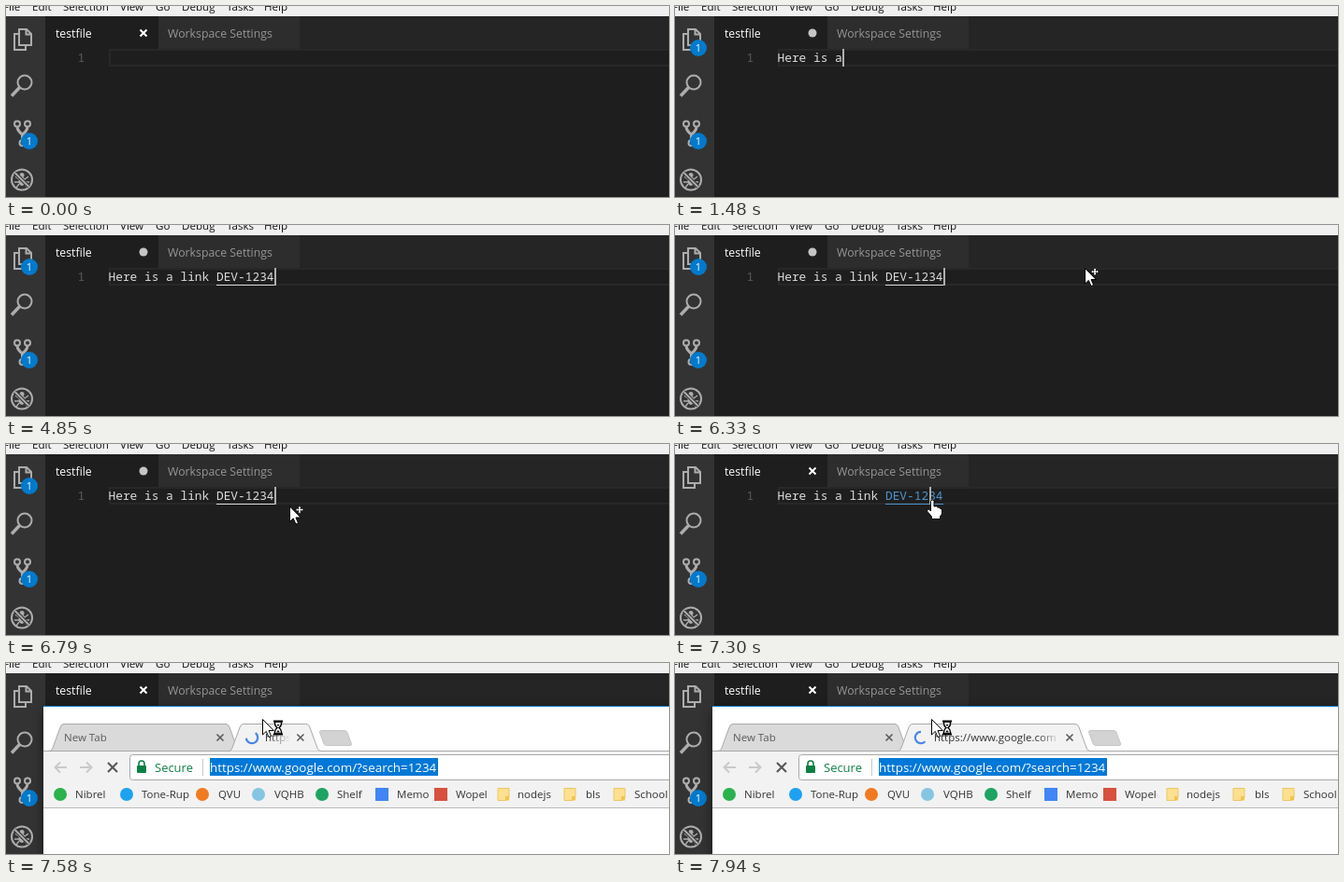
These frames come from a looping animation (709x205 px, 7990 ms). An HTML page:

```html
<!DOCTYPE html>
<html lang="en">
<head>
<meta charset="utf-8">
<title>Editor link</title>
<style>
  html, body { margin: 0; width: 709px; height: 205px; overflow: hidden; background: #1e1e1e; }
  svg { display: block; }
  text { font-family: "Open Sans", "Noto Sans", sans-serif; white-space: pre; }
  .menu { font-size: 11.6px; fill: #111; }
  .tab { font-size: 12.3px; }
  .code { font-family: "Noto Sans Mono", "DejaVu Sans Mono", monospace; font-size: 12.83px; fill: #dcdcdc; }
  .chrome { font-size: 11.5px; fill: #333; }
  .omni { font-size: 13.4px; }
  .badge { font-size: 11px; fill: #fff; text-anchor: middle; }
  .icon { fill: none; stroke: #adadad; stroke-width: 2; }
  .close { fill: none; stroke: #5a5a5a; stroke-width: 1.6; }
  .nav { fill: none; stroke: #c9c9c9; stroke-width: 2; }
  .dark { stroke: #555; }
  .pointer { fill: #fff; stroke: #000; stroke-linejoin: round; }
</style>
</head>
<body>
<svg id="stage" width="709" height="205" viewBox="0 0 709 205">
  <defs>
    <linearGradient id="fadeOut">
      <stop offset="0" stop-color="#f2f2f2" stop-opacity="0"/>
      <stop offset="1" stop-color="#f2f2f2"/>
    </linearGradient>
    <filter id="shadow" x="-10%" y="-20%" width="120%" height="140%">
      <feGaussianBlur stdDeviation="6"/>
    </filter>
    <path id="arrow" d="M.5 .5V17L4.3 13.4 7 19.6 9.6 18.4 7 12.5H12.3z"/>
  </defs>

  <rect width="709" height="205" fill="#1e1e1e"/>
  <rect width="709" height="11" fill="#f0f0f0"/>
  <g id="menu" class="menu"></g>

  <!-- editor tabs -->
  <rect x="42" y="11" width="667" height="35" fill="#252526"/>
  <rect x="42" y="11" width="121" height="35" fill="#1e1e1e"/>
  <rect x="163" y="11" width="151" height="35" fill="#2d2d2d"/>
  <text class="tab" x="53" y="34" fill="#fff">testfile</text>
  <text class="tab" x="173" y="34" fill="#969696">Workspace Settings</text>
  <path id="saved" d="M143.5 25.5l7 7m0-7l-7 7" stroke="#fff" stroke-width="2"/>
  <circle id="dirty" cx="147" cy="29" r="4.5" fill="#c5c5c5"/>

  <!-- activity bar -->
  <rect y="11" width="42" height="194" fill="#333"/>
  <g class="icon">
    <path d="M14 25H22L27 30V42H14zM21.500 25V30.500H27M13 30H9V47H21V43"/>
    <circle cx="20" cy="82" r="7.500"/>
    <path d="M14.500 87.500L6 96.500" stroke-width="3.500"/>
    <circle cx="12" cy="126.500" r="3"/>
    <circle cx="23" cy="126.500" r="3"/>
    <circle cx="17.500" cy="147" r="3"/>
    <path d="M12 130Q12.500 134 17.500 138Q22.500 134 23 130M17.500 137V144" stroke-width="3"/>
    <circle cx="17" cy="186.500" r="11"/>
    <ellipse cx="17" cy="188" rx="3.500" ry="5" fill="#adadad" stroke="none"/>
    <circle cx="17" cy="181.500" r="2.500" fill="#adadad" stroke="none"/>
    <path d="M10 183L14 186M24 183L20 186M9 189H14M25 189H20M11 195L14 191M23 195L20 191" stroke-width="1.400"/>
    <path d="M9.500 179L24.500 194" stroke="#333" stroke-width="4"/>
    <path d="M9.500 179L24.500 194"/>
  </g>
  <g id="filesBadge">
    <circle cx="25" cy="45" r="9" fill="#007acc"/>
    <text class="badge" x="25" y="49">1</text>
  </g>
  <circle cx="25" cy="145" r="9" fill="#007acc"/>
  <text class="badge" x="25" y="149">1</text>

  <!-- code line -->
  <rect x="111" y="47" width="620" height="17" fill="none" stroke="#282828" stroke-width="2"/>
  <text class="code" x="76.500" y="60" style="fill:#5a5a5a">1</text>
  <text class="code" x="109.500" y="60"><tspan id="plain"></tspan><tspan id="link"></tspan></text>
  <rect id="underline" x="225" y="64" width="62" height="1"/>
  <rect id="caret" y="46" width="2" height="19" fill="#aeafad"/>

  <!-- browser window -->
  <g id="browser">
    <rect x="40" y="50" width="720" height="200" opacity=".5" filter="url(#shadow)"/>
    <rect x="40" y="46" width="669" height="159" fill="#fff"/>
    <rect x="40" y="46" width="669" height="1" fill="#1883d7"/>
    <g stroke="#a9a9a9">
      <path id="plus" d="M249.500 74q0-1.500 2-1.500H276q2 0 3 2l4.500 12q.5 2-1.500 2H257q-2 0-3-2z" fill="#d3d3d3" stroke="#c4c4c4"/>
      <path id="backTab"/>
      <path d="M40 94.500H709"/>
    </g>
    <text id="firstTitle" class="chrome" x="62" y="84">New Tab</text>
    <path class="close" d="M225.500 76.500l7 7m0-7l-7 7"/>
    <rect x="40" y="95" width="669" height="60" fill="#f2f2f2"/>
    <path id="frontTab" fill="#f2f2f2" stroke="#a9a9a9"/>
    <g id="frontFirst">
      <text class="chrome" x="62" y="84">New Tab</text>
      <path class="close" d="M225.500 76.500l7 7m0-7l-7 7"/>
    </g>
    <g id="second">
      <path id="spinner" d="M263 73.800A6.200 6.200 0 1 0 267.500 84.300" fill="none" stroke="#4b86e8" stroke-width="2.200"/>
      <svg id="title" x="277" y="66" height="26">
        <text class="chrome" y="18">https://www.google.com</text>
      </svg>
      <g id="tabEnd">
        <rect x="388" y="70" width="24" height="20" fill="url(#fadeOut)"/>
        <path class="close" d="M418.500 76.500l7 7m0-7l-7 7"/>
      </g>
    </g>

    <path class="nav" d="M65 112H53M58 106.500L52.500 112L58 117.500M79 112H91M86 106.500L91.500 112L86 117.500"/>
    <rect x="132.500" y="98.500" width="620" height="27" rx="3" fill="#fff" stroke="#a8a8a8"/>
    <g id="idle">
      <path class="nav dark" d="M118.500 108A5.700 5.700 0 1 0 119.600 113"/>
      <path d="M120.500 105v6h-6z" fill="#555"/>
      <circle class="nav dark" cx="145" cy="110.500" r="4" style="stroke-width:1.600"/>
      <path class="nav dark" d="M148 113.500L152 117.500"/>
      <circle cx="565" cy="223" r="20.500" fill="#5a5558"/>
    </g>
    <g id="loading">
      <path class="nav dark" d="M109 107l10 10m0-10l-10 10"/>
      <rect x="140" y="110" width="10" height="8" rx="1" fill="#0b8043"/>
      <path d="M142 110V108a3 3 0 0 1 6 0V110" fill="none" stroke="#0b8043" stroke-width="1.600"/>
      <text class="omni" x="159" y="117" fill="#0b8043" style="font-size:13px">Secure</text>
      <path d="M210.500 103V121" stroke="#c8c8c8"/>
      <rect x="218" y="102" width="244" height="19" fill="#0078d7"/>
      <text class="omni" x="218" y="117" fill="#fff">https://www.google.com/?search=1234</text>
    </g>
    <path d="M40 155.500H709" stroke="#b8b8b8"/>
    <g id="bookmarks" class="chrome"></g>
  </g>

  <!-- pointers -->
  <g id="mover" class="pointer">
    <use href="#arrow"/>
    <path d="M11 0l2 2.200h-1v1h1v-1l2.200 1.800-2.200 2v-1h-1v1h1l-2 2.200-2-2.200h1v-1h-1v1l-2.200-2 2.200-1.800v1h1v-1h-1z" stroke-width=".6"/>
  </g>
  <path id="hand" class="pointer" transform="translate(275.500 60)"
    d="M-2 1.500Q-2 0 -.3 0T1.500 1.500V7Q4.500 6.200 5.300 8Q7.600 7.500 8 9.300Q10 9 10 11.200V15L8 18V20.500H-1V18L-6 12Q-6 9.600 -4 10L-2 12z"/>
  <g id="busy" transform="translate(274 60)">
    <use href="#arrow" class="pointer"/>
    <g fill="#fff" stroke="#000" stroke-width="1.500">
      <path d="M13.500 3V5Q13.500 7.500 16 9.500Q13.500 11.500 13.500 14V16H20.500V14Q20.500 11.500 18 9.500Q20.500 7.500 20.500 5V3z"/>
      <path d="M12 2.500H22M12 16.500H22" stroke-width="2"/>
      <path d="M15.500 6H18.500L17 8zM15 14.500L17 12L19 14.500z" fill="#000" stroke="none"/>
    </g>
  </g>
</svg>

<script>
const LOOP = 7990;
const LINE = "Here is a link DEV-1234";
const LINK_AT = 15, CHAR = 7.7, TEXT_X = 110;
const KEYS = [590, 820, 900, 970, 1150, 1250, 1330, 1400, 1480, 1660, 2350, 2500,
  2580, 2730, 2810, 3040, 3270, 3420, 3880, 4340, 4430, 4520, 4670];
const CARET_OFF = [[0, 410], [2120, 2350], [5130, 5640], [6150, 6280]];
const PATH = [[6180, 56, 6], [6330, 438, 46], [6430, 438, 46], [6680, 350, 77], [6970, 274, 60]];
const AT = { linked: 4850, mouse: 6180, save: 7000, hover: 7050, click: 7250, browser: 7430, load: 7530, opened: 7730 };

const $ = id => document.getElementById(id);
const show = (id, on) => $(id).setAttribute("display", on ? "inline" : "none");
const shift = (id, x, y = 0) => $(id).setAttribute("transform", `translate(${x} ${y})`);
const clamp = v => Math.max(0, Math.min(1, v));
const ease = v => 1 - (1 - v) ** 2;
const label = (x, y, s) => `<text x="${x}" y="${y}">${s}</text>`;

$("menu").innerHTML = [[-3, "File"], [28, "Edit"], [61, "Selection"], [122, "View"],
  [160, "Go"], [188, "Debug"], [236, "Tasks"], [276, "Help"]].map(([x, s]) => label(x, 5, s)).join("");

const dot = color => x => `<circle cx="${x}" cy="141" r="7" fill="${color}"/>`;
const square = color => x => `<rect x="${x - 7}" y="134" width="14" height="14" fill="${color}"/>`;
const folder = x => `<path d="M${x - 6} 134.500h12v10h-3v3h-9z" fill="#ffe08f" stroke="#eac766"/>
  <path d="M${x + 2} 143h4v4.500h-4z" fill="#f3c54f"/>`;
$("bookmarks").innerHTML = [
  [58, 74, "Nibrel", dot("#2bb24c")], [129, 145, "Tone-Rup", dot("#1da1f2")],
  [210, 227, "QVU", dot("#f07a20")], [270, 287, "VQHB", dot("#86c5e2")],
  [338, 354, "Shelf", dot("#1da362")], [402, 418, "Memo", square("#4285f4")],
  [465, 481, "Wopel", square("#d9503f")], [532, 547, "nodejs", folder],
  [603, 620, "bls", folder], [656, 672, "School", folder]
].map(([ix, tx, s, icon]) => icon(ix) + label(tx, 145, s)).join("");

function tabPath(x, w) {
  const lean = Math.min(12, w / 2 - 4);
  return `M${x} 94.500q3 0 4-3.500L${x + lean} 69q1.200-3.500 4-3.500H${x + w - lean - 4}` +
    `q2.800 0 4 3.500L${x + w - 4} 91q1 3.500 4 3.500`;
}

function pointerAt(t) {
  const i = PATH.findIndex(p => p[0] > t);
  if (i < 0) return PATH[PATH.length - 1].slice(1);
  if (i === 0) return PATH[0].slice(1);
  const [t0, x0, y0] = PATH[i - 1], [t1, x1, y1] = PATH[i];
  const k = ease((t - t0) / (t1 - t0));
  return [x0 + (x1 - x0) * k, y0 + (y1 - y0) * k];
}

function drawEditor(t) {
  const typed = KEYS.filter(k => k <= t).length;
  const hover = t >= AT.hover;
  const linkColor = hover ? "#4e94ce" : "#dcdcdc";
  $("plain").textContent = LINE.slice(0, Math.min(typed, LINK_AT));
  $("link").textContent = LINE.slice(LINK_AT, Math.max(typed, LINK_AT));
  $("link").style.fill = linkColor;
  $("underline").setAttribute("fill", linkColor);
  show("underline", t >= AT.linked);

  const column = t >= AT.click ? 21 : typed;
  $("caret").setAttribute("x", Math.round(TEXT_X + column * CHAR));
  show("caret", !CARET_OFF.some(([a, b]) => t >= a && t < b));

  const dirty = t >= 640 && t < AT.save;
  show("dirty", dirty);
  show("saved", !dirty);
  show("filesBadge", t >= 820 && t < AT.save);
}

function drawBrowser(t) {
  const open = t >= AT.browser, load = t >= AT.load;
  show("browser", open);
  if (!open) return;
  const p = ease(clamp((t - AT.load) / (AT.opened - AT.load)));
  const grow = 193 * p;
  $("backTab").setAttribute("d", tabPath(46, 205));
  $("backTab").setAttribute("fill", load ? "#dadada" : "#f2f2f2");
  $("firstTitle").style.fill = load ? "#5a5a5a" : "#333";
  $("frontTab").setAttribute("d", load ? tabPath(238, 13 + grow) : tabPath(46, 205));
  shift("plus", grow);
  shift("tabEnd", grow - 193);
  $("title").setAttribute("width", Math.max(0.1, grow - 60));
  $("spinner").setAttribute("transform", `rotate(${(t - 7940) * 0.27} 263 80)`);
  show("frontFirst", !load);
  show("second", p > 0.4);
  show("idle", !load);
  show("loading", load);
}

function render(t) {
  drawEditor(t);
  drawBrowser(t);
  shift("mover", ...pointerAt(t));
  show("mover", t >= AT.mouse && t < AT.hover);
  show("hand", t >= AT.hover && t < AT.browser);
  show("busy", t >= AT.browser);
}

const start = performance.now();
function tick() {
  render((performance.now() - start) % LOOP);
  requestAnimationFrame(tick);
}
tick();
</script>
</body>
</html>
```
